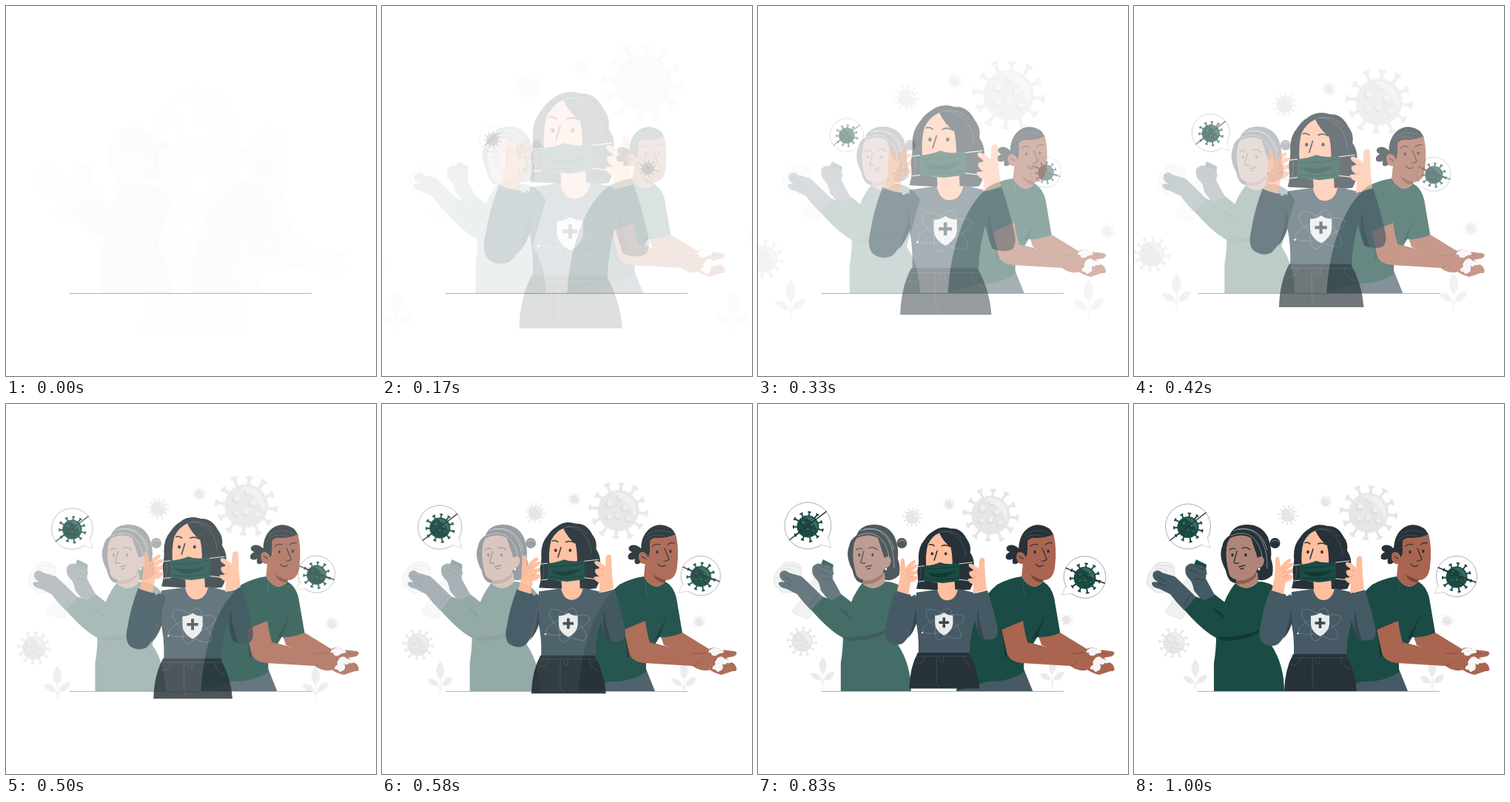
Recreate the animation shown at these times as an HTML page. Size 500 px wide and 500 px high, loop 1.04 s.

```html
<!DOCTYPE html>
<html lang="en">
<head>
<meta charset="utf-8">
<title>Stay protected</title>
<style>
html, body { margin: 0; width: 100%; height: 100%; overflow: hidden; background: #fff }
svg { display: block; width: 100vw; height: 100vh }
.line { fill: none; stroke-linecap: round; stroke-linejoin: round }
.ink { stroke: #263238 }
.dark { fill: #263238 }
.green { fill: #1a4b44 }
.shade { fill: #123832 }
.slate { fill: #455a64 }
.pale { fill: #ffbe9d }
.brown { fill: #a96550 }
.tan { fill: #b08577 }
</style>
</head>
<body>
<svg viewBox="0 0 500 500">
  <defs>
    <g id="plant" fill="#ebebeb">
      <path d="M83 345C90 353 90 362 83 369C76 362 76 353 83 345ZM81 377C74 379 68 374 66 368C74 366 80 370 81 377ZM85 377C86 369 92 365 99 366C98 373 93 379 85 377Z"/>
      <path class="line" stroke="#ebebeb" d="M83 365V388M74 371Q82 376 83 383M92 371Q84 376 83 383"/>
    </g>
  </defs>

  <g id="back">
    <use href="#plant"/>
    <use href="#plant" x="320"/>
  </g>
  <path d="M86 388.4H413" stroke="#263238" stroke-width=".4"/>
  <g id="bubbles"></g>

  <g id="left">
    <!-- bottle and cloth -->
    <path fill="#f0f0f0" stroke="#c4c4c4" stroke-width=".4" d="M43 279Q56 263 69 239Q77 227 87 233Q89 247 80 262L66 289Q63 292 59 289L46 284Q42 282 43 279Z"/>
    <path class="green" d="M79 222L84 210L98 217L97 226L99 230L82 231L76 225Z"/>
    <path fill="#f0f0f0" stroke="#b8b8b8" stroke-width=".4" d="M26 221Q31 212 42 214Q55 213 55 225L53 243Q47 258 39 254Q28 258 24 249Q16 248 18 238Q17 229 26 221Z"/>
    <path class="line" stroke="#cfcfcf" stroke-width=".7" d="M30 220Q42 215 52 222M27 225Q38 219 45 226"/>
    <path class="green" d="M91 262L106 255L124 269L120 288L108 285Z"/>
    <path class="slate" d="M70 220Q77 212 84 218Q93 216 98 225L97 236L109 258L93 267L81 252Q79 240 75 237Q67 229 70 220Z"/>
    <path class="line ink" d="M76 224L92 231M80 219L95 224M83 236L94 238" stroke-opacity=".6"/>
    <!-- body -->
    <path class="green" d="M137 242Q153 256 168 240Q190 240 203 262L185 325Q203 352 203 388H108V350Q111 332 111 316Q92 306 67 277L83 260Q103 267 118 280Q124 258 137 242Z"/>
    <path class="shade" d="M110 315Q145 317 176 302Q160 319 126 320Q117 320 110 315ZM104 273L118 283L123 291Q112 284 104 273Z"/>
    <path class="slate" d="M26 228Q32 222 38 228L55 233Q66 243 84 261L68 279Q57 268 49 257L35 250Q23 247 24 242Q25 239 33 241Q23 236 26 228Z"/>
    <path class="line ink" d="M30 232L43 240M32 241L43 246M68 270L76 259" stroke-opacity=".6"/>
    <!-- head -->
    <circle class="dark" cx="190.500" cy="188" r="7"/>
    <path class="dark" d="M129 178Q134 164 151 163Q172 162 181 180Q187 196 185 209Q189 219 187 231Q178 241 165 237L137 242Q127 241 124 225Q114 206 119 193Q121 182 129 178Z"/>
    <path class="tan" d="M139 228H167L168 240Q153 256 138 243Z"/>
    <path d="M139 239Q155 238 165 228V233Q155 245 138 243Z" fill="#8c5f52"/>
    <path class="tan" d="M130 181Q146 174 158 181L167 208Q174 203 176 211Q175 222 167 222Q164 234 148 238Q133 239 129 231Q123 210 125 195Q126 185 130 181Z"/>
    <path class="line ink" d="M129 197Q133 194 137 196M146 195Q152 192 157 197M139 199L135 214Q137 216 141 215M142 220L150 218M144 223L148 222" stroke-width="1.300"/>
    <ellipse class="dark" cx="133" cy="204" rx="1.600" ry="2.200"/>
    <ellipse class="dark" cx="151" cy="204" rx="1.600" ry="2.200"/>
    <circle cx="169" cy="223" r="1.500" fill="#fff"/>
    <path class="line" stroke="#aab3b6" stroke-width=".7" d="M135 171Q160 163 173 185Q181 202 180 222M140 169Q171 164 180 197M131 178Q154 168 166 187Q172 196 173 207M186 186Q191 182 196 186"/>
  </g>

  <g id="right">
    <path class="slate" d="M267 388L290 360L358 358L370 388Z"/>
    <!-- far arm -->
    <path class="brown" d="M375 306L404 307L443 331Q450 327 460 332L477 334Q484 336 477 341L466 343L478 352Q484 362 475 361L460 366Q440 361 435 348L382 326Z"/>
    <path class="green" d="M355 233Q369 256 384 240Q395 246 399 262L407 309Q392 316 376 315L358 346V362Q338 376 309 375L267 388Q270 340 283 305Q296 266 322 244Q336 236 355 233Z"/>
    <path class="shade" d="M388 282L376 315L369 318L380 299ZM327 304Q333 328 332 343Q341 340 335 302Z"/>
    <!-- near arm -->
    <path class="brown" d="M328 305L357 293Q359 309 363 322L421 337Q437 333 449 338Q462 350 456 356L441 360Q430 361 421 354L355 350Q338 348 335 336Z"/>
    <path class="line" stroke="#7c4434" stroke-width=".7" d="M363 322L384 328M421 337Q430 338 439 336M422 354L429 350M455 333L470 338M450 345L464 351"/>
    <path fill="#f5f5f5" d="M444 332Q452 327 456 331Q463 330 463 336Q455 337 453 340Q445 341 446 336Q440 337 444 332ZM455 343Q460 339 464 344L474 347Q475 351 467 350Q465 354 461 351Q464 359 457 361Q455 364 452 359Q445 359 449 354Q453 353 451 349Q452 346 455 343Z"/>
    <!-- head -->
    <path class="dark" d="M352 196Q342 187 335 193Q333 198 339 200Q332 203 334 209Q339 212 343 209Q341 218 348 216Q355 212 357 206Z"/>
    <path class="dark" d="M351 202Q350 180 361 170Q372 160 386 165Q397 169 399 181L380 184L364 193L362 209Z"/>
    <path class="brown" d="M357 213L355 233Q369 256 384 240V225Z"/>
    <path d="M367 230Q374 236 386 236L383 241Q372 242 367 230Z" fill="#7c4434"/>
    <path class="brown" d="M363 185Q367 180 374 181Q388 181 398 176Q403 194 400 220Q398 237 386 238Q369 236 361 216Q350 218 348 209Q347 199 354 200Q360 202 360 207L363 204Z"/>
    <path class="line ink" d="M367 192Q371 188 377 190M387 190Q392 186 396 188M383 195L389 210Q386 213 382 212M374 216Q378 222 384 218M352 206L357 209" stroke-width="1.200"/>
    <ellipse class="dark" cx="373" cy="200" rx="1.600" ry="2.300"/>
    <ellipse class="dark" cx="391" cy="199" rx="1.600" ry="2.300"/>
    <path class="line" stroke="#52636a" stroke-width=".6" d="M358 178Q372 166 392 174M357 184Q365 174 382 178M358 240Q356 250 360 259"/>
  </g>

  <g id="mid">
    <path class="dark" d="M236 169Q247 160 262 165Q275 164 283 179Q290 188 288 198Q296 210 292 222Q297 234 288 250L266 252L213 249Q217 237 214 225Q217 214 216 205Q216 190 224 181Q229 173 236 169Z"/>
    <path class="pale" d="M242 230H266L267 250H272L264 266H249L240 251L243 250Z"/>
    <path class="pale" d="M245 171Q251 184 261 191Q265 208 262 232Q250 242 239 240Q228 238 227 221Q225 202 229 187Q235 175 245 171Z"/>
    <path class="slate" d="M213 254L242 250Q246 266 257 265Q268 264 271 249L297 255L298 282Q288 308 287 340H216Q217 310 211 290Z"/>
    <path class="slate" d="M184 251Q194 256 205 257Q204 262 211 257Q218 264 214 278Q208 313 194 325Q183 330 173 322Q167 314 171 299Q174 278 184 251ZM290 257L312 251Q321 278 326 302Q328 313 323 318Q313 322 302 317Q296 303 293 286Z"/>
    <path d="M212 276L214 294Q210 309 201 318Q210 300 212 276ZM299 277Q301 302 308 319L302 317Q295 302 299 277Z" fill="#37474f"/>
    <path class="dark" d="M215 338H286Q299 361 301 388H203Q204 358 215 338Z"/>
    <path class="line" stroke="#4e5c63" stroke-width=".6" d="M214 343H288M241 343V379Q242 384 246 386M212 352Q223 356 225 343M279 343Q280 355 292 358M251 343V350Q246 353 245 345"/>
    <!-- emblem -->
    <g class="line" stroke="#94a3aa" stroke-width=".4">
      <ellipse cx="251" cy="298" rx="30" ry="10" transform="rotate(-18 251 298)"/>
      <ellipse cx="251" cy="298" rx="30" ry="11" transform="rotate(38 251 298)"/>
      <ellipse cx="251" cy="298" rx="10" ry="23" transform="rotate(18 251 298)"/>
    </g>
    <g fill="#ebebeb">
      <circle cx="221.500" cy="310" r="1.200"/>
      <path d="M239 286Q247 286 251.500 282Q257 286 264 286V298Q263 308 251.500 314Q240 308 239 298Z"/>
    </g>
    <path d="M251.500 289V303M244.500 296H258.500" stroke="#37474f" stroke-width="3.600"/>
    <!-- face and mask -->
    <path class="line ink" d="M231 187.500Q235 186 238 189M248.500 189Q254 186.500 260 190M242 196L238 209" stroke-width="1.500"/>
    <ellipse class="dark" cx="235" cy="200" rx="1.800" ry="2.200"/>
    <ellipse class="dark" cx="254" cy="200" rx="1.800" ry="2.200"/>
    <path class="green" d="M224 217Q237 216 246 212Q257 216 273 213V238L250 241L224 238Z"/>
    <path class="shade" d="M229 226Q247 230 268 224Q256 235 241 233Q232 231 229 226Z"/>
    <path class="line" stroke="#123832" d="M227 221Q246 222 271 217M227 235Q249 238 271 234"/>
    <path class="line" stroke="#dfe4e5" stroke-width="1" d="M224 217L205 219M224 238L207 240M273 214L291 212M273 236L290 238"/>
    <!-- hands -->
    <path class="pale" d="M186 252L190 235L191 210Q192 205 196 207L198 220Q203 212 210 209Q214 210 211 213L203 220Q210 214 214 215Q217 217 212 220L205 225L213 223Q217 225 213 228L208 231Q215 230 215 234Q212 239 205 240L202 257ZM292 256L293 243Q285 240 285 235L292 234Q285 230 287 225L294 223Q285 219 286 215Q289 211 300 221L301 208Q304 203 308 207L309 232L311 250Z"/>
    <path class="line" stroke="#e58f70" stroke-width=".7" d="M203 220L199 224M205 225L201 229M208 231L202 234M294 223L298 225M292 234L297 232"/>
    <path class="line" stroke="#5b6c74" stroke-width=".6" d="M245 171Q254 166 266 174Q281 184 282 204M249 169Q267 166 277 179M217 241Q221 228 219 216"/>
  </g>
</svg>
<script>
const $ = id => document.getElementById(id);
const grey = ['#e6e6e6', '#f0f0f0', '#dcdcdc'];
const teal = ['#1a4b44', '#3b6a63', '#123832'];

function virus(x, y, r, n, [base, light, dark]) {
  let spikes = '';
  for (let i = 0; i < n; i++) {
    const cap = r * (i % 2 ? 1.38 : 1.3);
    spikes += `<path transform="rotate(${i * 360 / n + 6})" d="M0 ${-r * .8}V${-cap}M${-r * .09} ${-cap}H${r * .09}"/>`;
  }
  const dots = [[-.45, -.3, .2], [.3, -.1, .18], [-.05, .3, .15], [.45, .45, .14], [-.5, .35, .13], [.05, -.6, .14]]
    .map(([a, b, c]) => `<circle cx="${a * r}" cy="${b * r}" r="${c * r}" fill="${dark}"/>
      <circle cx="${(a + .04) * r}" cy="${(b - .05) * r}" r="${c * r * .75}" fill="${light}"/>`).join('');
  return `<g transform="translate(${x} ${y})">
    <g class="line" stroke="${base}" stroke-width="${r * .14}">${spikes}</g>
    <circle r="${r}" fill="${base}"/>
    <path d="M${-r * .3} ${-r * .85}A${r * .9} ${r * .9} 0 0 1 ${r * .8} ${r * .35}Q${r * .55} ${-r * .5} ${-r * .3} ${-r * .85}Z" fill="${light}"/>
    ${dots}</g>`;
}

function bubble(x, y, r, tail, slash) {
  return `<g class="ink" stroke-width=".4" fill="#fff"><path d="${tail}"/>
    <circle cx="${x}" cy="${y}" r="${r}"/></g>
    <path fill="#fff" d="${tail}"/>
    ${virus(x, y + 1, 14.5, 11, teal)}
    <path class="line ink" stroke-width="1.4" d="${slash}"/>`;
}

$('back').innerHTML += [[317, 147, 27, 12], [54, 323, 14.5, 12], [208, 150, 9.5, 12], [259, 132, 6, 10], [423, 293, 6, 10]]
  .map(v => virus(...v, grey)).join('');
$('bubbles').innerHTML =
  bubble(73, 165.5, 30.5, 'M90 190L103 194L99 180Z', 'M49 184L97 147') +
  bubble(436, 233, 27.5, 'M411 245L406 256L421 254Z', 'M411 221L462 241');

// cubic-bezier(.36, -.01, .5, 1.38), solved by bisection
const bez = (a, b, u) => 3 * a * u * (1 - u) ** 2 + 3 * b * u * u * (1 - u) + u ** 3;
function overshoot(x) {
  let lo = 0, hi = 1;
  for (let i = 0; i < 24; i++) {
    const m = (lo + hi) / 2;
    if (bez(.36, .5, m) < x) lo = m; else hi = m;
  }
  return bez(-.01, 1.38, lo);
}

function pose(id, alpha, move) {
  $(id).setAttribute('opacity', Math.max(0, Math.min(1, alpha)));
  $(id).setAttribute('transform', move);
}
const zoom = (x, y, s) => `translate(${x} ${y}) scale(${s}) translate(${-x} ${-y})`;
const slide = x => `translate(${x} 0)`;

function draw(now) {
  // 24 steps a second; the first one is held twice as long
  let step = Math.floor((now % 1040 + 5) * .024);
  if (step === 1) step = 0;
  const p = Math.min(1, (step + 1) / 24);
  const e = p < 1 ? overshoot(p) : 1;
  const slow = p ** 1.6;
  pose('back', e, zoom(233, 250, 1.5 - e / 2));
  pose('bubbles', e, zoom(254, 200, .5 + e / 2));
  pose('left', slow, slide(20 * (1 - slow)));
  pose('right', e, slide(20 * (e - 1)));
  pose('mid', e, zoom(245, 275.5, 1.5 - e / 2));
}

const start = performance.now();
function tick() {
  draw(performance.now() - start);
  requestAnimationFrame(tick);
}
tick();
</script>
</body>
</html>
```
